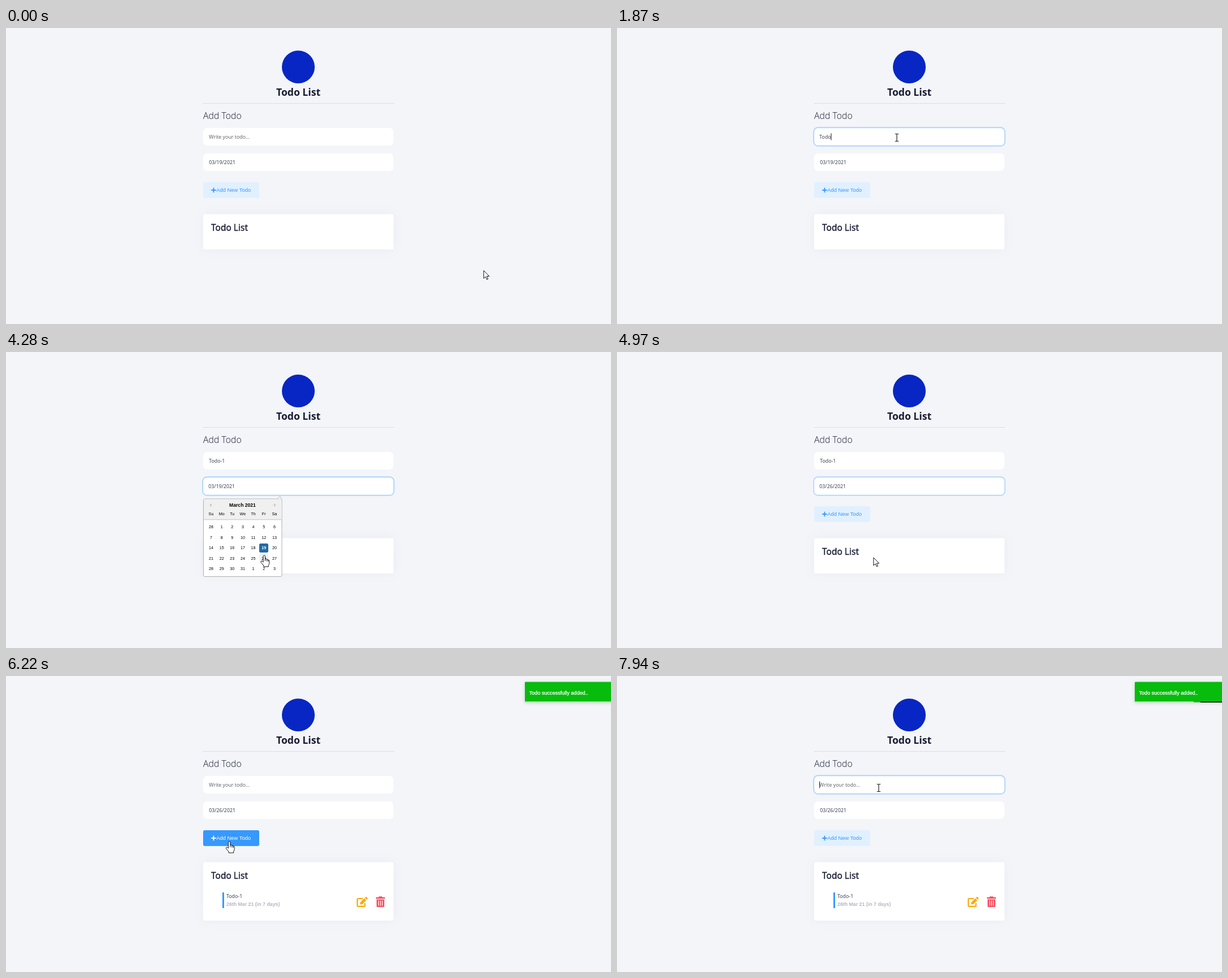
Animation of 1068x524 px, one loop 8 s. Source, as an HTML page:

```html
<!DOCTYPE html>
<html lang="en">
<head>
<meta charset="utf-8">
<title>Todo List</title>
<style>
  html, body { margin: 0; width: 100%; height: 100%; overflow: hidden; background: #f3f5f9; }
  svg { display: block; width: 1068px; height: 524px; }
  text { font-family: "Noto Sans", "Open Sans", sans-serif; fill: #181c32; white-space: pre; }
  .small { font-size: 8.8px; fill: #3f4254; }
  .light { font-family: "Open Sans", "Noto Sans", sans-serif; font-weight: 300; font-size: 15.9px; }
  .medium { font-size: 15.5px; stroke: #181c32; stroke-width: .35; }
  .sans, .cal text { font-family: "Liberation Sans", Arial, sans-serif; }
  .field { fill: #fff; }
  .ring { fill: #fff; stroke: #add5fd; stroke-width: 1.9; }
  .card { fill: #fff; filter: drop-shadow(0 0 9px rgba(60, 80, 110, .06)); }
  .cal text { font-size: 7.2px; fill: #000; text-anchor: middle; }
  .cal .month { font-size: 8.6px; font-weight: bold; }
  .cal .picked { fill: #fff; font-weight: bold; }
  .pointer { fill: #fff; stroke: #111; stroke-width: 1; stroke-linejoin: round; }
  .toast { filter: drop-shadow(0 1px 3px rgba(0, 0, 0, .16)); }
</style>
</head>
<body>
<svg viewBox="0 0 1068 524">
  <rect width="1068" height="524" fill="#f3f5f9"/>

  <circle cx="516" cy="69" r="29" fill="#0726c4"/>
  <text x="516" y="120" text-anchor="middle" font-size="17.6" font-weight="700">Todo List</text>
  <path d="M348 133.5H685" stroke="#dadde3"/>
  <text class="light" x="348" y="161">Add Todo</text>

  <rect class="field" x="348" y="177" width="336" height="31" rx="7"/>
  <rect class="ring" id="ringTodo" x="347.2" y="176.2" width="337.6" height="32.6" rx="7.5"/>
  <text class="small" id="todo" y="196"></text>
  <path id="caret" stroke="#111" stroke-width="1"/>

  <rect class="field" x="348" y="222" width="336" height="31" rx="7"/>
  <rect class="ring" id="ringDate" x="347.2" y="221.2" width="337.6" height="32.6" rx="7.5"/>
  <text class="small" id="date" y="241"></text>

  <rect id="button" x="348" y="273" width="99" height="28" rx="3"/>
  <g id="label">
    <path d="M362.3 287H370.7M366.5 282.8V291.2" stroke="currentColor" stroke-width="1.9"/>
    <text class="sans" x="371.3" y="290" font-size="9.4" style="fill:currentColor">Add New Todo</text>
  </g>

  <rect class="card" id="card" x="348" y="329.5" width="336" height="62.5" rx="3"/>
  <text class="medium" x="362" y="359">Todo List</text>

  <g id="item">
    <rect x="382" y="383" width="3" height="28" rx="1" fill="#3699ff"/>
    <text class="small" x="389" y="393">Todo-1</text>
    <text class="sans" x="389" y="407" font-size="8.8" font-weight="700" style="fill:#b5b5c3">26th Mar 21 (in 7 days)</text>
    <g fill="#ffa800">
      <path d="M630 394H621.8Q620.2 394 620.2 395.6V406.2Q620.2 407.8 621.8 407.8H632Q633.6 407.8 633.6 406.2V402" fill="none" stroke="#ffa800" stroke-width="2.2"/>
      <path d="M625 404.5L625.6 400.5L632.5 393.6L635.9 397L629 403.9Z"/>
      <path d="M633.4 392.7L634.8 391.3Q635.7 390.6 636.6 391.3L638 392.8Q638.7 393.7 638 394.6L636.8 396Z"/>
    </g>
    <g fill="#f64e60">
      <path d="M653 391.7H657.4L658.4 390.2H663.6L664.6 391.7H669V394.2H653Z"/>
      <path d="M654.2 395.4H667.8V407.4Q667.8 409 666.2 409H655.8Q654.2 409 654.2 407.4Z"/>
      <path d="M657.6 397.5V406.7M661 397.5V406.7M664.4 397.5V406.7" stroke="#fff" stroke-width="1.2"/>
    </g>
  </g>

  <g class="cal" id="cal">
    <rect x="348.5" y="260" width="138.5" height="137.5" rx="2.5" fill="#fff" stroke="#aeaeae"/>
    <path d="M349 296.5V262.5Q349 260.5 351 260.5H484.5Q486.5 260.5 486.5 262.5V296.5Z" fill="#f0f0f0"/>
    <path d="M349 296.8H486.5" stroke="#b9b9b9" stroke-width=".9"/>
    <path d="M479 260.5L483.5 255L487 260.5" fill="#f0f0f0" stroke="#b5b5b5" stroke-width=".8"/>
    <path d="M362.8 268V274L359.2 271ZM473 268V274L476.6 271Z" fill="#c4c4c4"/>
    <text class="month" x="417.5" y="273.8">March 2021</text>
    <rect id="hover" width="16" height="16" rx="2.5" fill="#f0f0f0"/>
    <rect x="447" y="339" width="16" height="16" rx="2.5" fill="#216ba5"/>
    <g id="days"></g>
  </g>

  <g id="toast">
    <rect class="toast" x="914" y="10.5" width="170" height="36" rx="1" fill="#07bc0c"/>
    <text class="sans" x="921.5" y="32.8" font-size="9.1" style="fill:#fff;stroke:#fff;stroke-width:.25">Todo successfully added..</text>
    <rect id="spent" y="45" height="2" fill="#0b2a0b"/>
    <rect id="bar" x="914" y="45" height="2" fill="#b5ebb6"/>
  </g>

  <g id="cursor">
    <path class="pointer" id="arrow" d="M0 0V14L3.2 11L5.5 16L7.6 15L5.4 10.2H9.8Z"/>
    <path class="pointer" id="hand" d="M-1.7 12V1.5Q-1.7 0 0 0Q1.7 0 1.7 1.5V6.5Q3.5 5.5 4.6 7Q6.2 6.5 7 8Q9 7.8 9 10V13.5Q9 16 7.5 17.5V20H-1V18L-5.5 12.5Q-6.5 10.5 -4.5 10Q-3 10.2 -1.7 12ZM1.7 6.5V10M4.6 7V10.5M7 8V11"/>
    <path id="beam" d="M-3.2 -6.5H-1Q0 -6.5 0 -5.5Q0 -6.5 1 -6.5H3.2M0 -5.5V5.5M-3.2 6.5H-1Q0 6.5 0 5.5Q0 6.5 1 6.5H3.2" fill="none" stroke="#222" stroke-width="1.2"/>
  </g>
</svg>
<script>
const LOOP = 8000, COL = 18.65, ROW = 18.5;
const el = Object.fromEntries([...document.querySelectorAll('[id]')].map(e => [e.id, e]));

// time, x, y
const path = [
  [0, 843.5, 429.5], [70, 828, 415], [230, 640, 270], [390, 497, 180], [460, 494, 194],
  [3110, 494, 194], [3260, 494, 212], [3340, 489, 230], [3490, 484, 242], [3810, 482, 240],
  [3980, 480, 250], [4130, 468, 308], [4280, 456, 360], [4510, 412, 364], [4740, 453, 364],
  [4970, 453, 364], [5140, 436, 350], [5370, 409.5, 326.5], [5600, 398, 300], [5750, 394, 293],
  [6220, 394, 293], [6450, 436, 304], [6840, 520.5, 318.5], [6920, 524, 323], [7000, 521, 316],
  [7300, 482, 226], [7480, 464, 198], [7790, 462, 198], [8000, 462, 198]
];
const slide = [[6150, 26], [6220, 2], [6300, 0], [8000, 0]];
const typed = [[1310, 'T'], [1640, 'To'], [1790, 'Tod'], [1870, 'Todo'], [2340, 'Todo-'], [2650, 'Todo-1'], [5830, '']];

const clamp = v => Math.max(0, Math.min(1, v));
const ramp = (t, a, b) => clamp((t - a) / (b - a));
const within = (t, a, b) => t >= a && t < b;
const show = (e, on) => { e.style.display = on ? '' : 'none'; };
const set = (e, attrs) => { for (const k in attrs) e.setAttribute(k, attrs[k]); };

function at(keys, t) {
  const i = Math.max(1, keys.findIndex(k => k[0] > t));
  const a = keys[i - 1], b = keys[i], p = ramp(t, a[0], b[0]);
  return a.slice(1).map((v, n) => v + (b[n + 1] - v) * p);
}

function addDay(text, x, y, cls) {
  const e = document.createElementNS('http://www.w3.org/2000/svg', 'text');
  set(e, { x, y, class: cls || '' });
  e.textContent = text;
  el.days.append(e);
}
'Su Mo Tu We Th Fr Sa'.split(' ').forEach((d, i) => addDay(d, 362 + i * COL, 289));
for (let i = 0; i < 35; i++) {
  const day = i === 0 ? 28 : (i - 1) % 31 + 1;
  addDay(day, 362 + i % 7 * COL, 312 + Math.floor(i / 7) * ROW, day === 19 ? 'picked' : '');
}

function mix(a, b, p) {
  return `rgb(${a.map((v, i) => Math.round(v + (b[i] - v) * p)).join()})`;
}

function drawFields(t) {
  const focus = t < 3660 ? ramp(t, 560, 800) : ramp(t, 7520, 7700);
  const dateFocus = within(t, 3660, 5050) ? ramp(t, 3600, 3780) * (1 - ramp(t, 4960, 5050)) : 0;
  const value = typed.reduce((v, k) => t >= k[0] ? k[1] : v, '');
  const x = focus > .3 ? 357.3 : 358.2;

  el.ringTodo.style.opacity = focus;
  el.todo.textContent = value || 'Write your todo...';
  el.todo.style.fill = value ? '#3f4254' : '#62656f';
  set(el.todo, { x });
  show(el.caret, focus > .3 && !within(t, 3180, 3660));
  const end = x + (value ? el.todo.getComputedTextLength() : 0) + .4;
  set(el.caret, { d: `M${end} 186.5V198.5` });

  el.ringDate.style.opacity = dateFocus;
  el.date.textContent = t < 4970 ? '03/19/2021' : '03/26/2021';
  set(el.date, { x: dateFocus > .3 ? 357.3 : 358.2 });
}

function drawCursor(t) {
  const [x, y] = at(path, t);
  const open = within(t, 3660, 4970);
  const col = Math.round((x - 362) / COL), row = Math.round((y - 309.5) / ROW);
  const onDay = open && y > 300;
  const onButton = !open && x > 348 && x < 447 && y > 273 && y < 301;
  const onField = x > 348 && x < 684 && (within(y, 177, 208) || within(y, 222, 253));

  show(el.hand, onDay || onButton);
  show(el.beam, onField);
  show(el.arrow, !onDay && !onButton && !onField);
  set(el.cursor, { transform: `translate(${x} ${y})` });

  show(el.cal, open);
  show(el.hover, onDay);
  set(el.hover, { x: 354 + col * COL, y: 301.5 + row * ROW });
}

function drawButton(t) {
  const p = ramp(t, 5600, 5740) * (1 - ramp(t, 6440, 6580));
  set(el.button, { fill: mix([225, 240, 255], [54, 153, 255], p) });
  el.label.style.color = mix([54, 153, 255], [255, 255, 255], p);
}

function drawToast(t) {
  show(el.toast, t >= 6150);
  if (t < 6150) return;
  const end = 1068 - Math.max(0, t - 6530) * .0355;
  const gone = (1068 - end) * .76;
  set(el.toast, { transform: `translate(${at(slide, t)[0]} 0)` });
  set(el.bar, { width: end - 914 });
  set(el.spent, { x: 1068 - gone, width: gone });
}

function draw(t) {
  drawFields(t);
  drawCursor(t);
  drawButton(t);
  drawToast(t);
  show(el.item, t >= 5830);
  set(el.card, { height: t >= 5830 ? 103.5 : 62.5 });
}

const start = performance.now();
function tick() {
  draw((performance.now() - start) % LOOP);
  requestAnimationFrame(tick);
}
tick();
</script>
</body>
</html>
```
